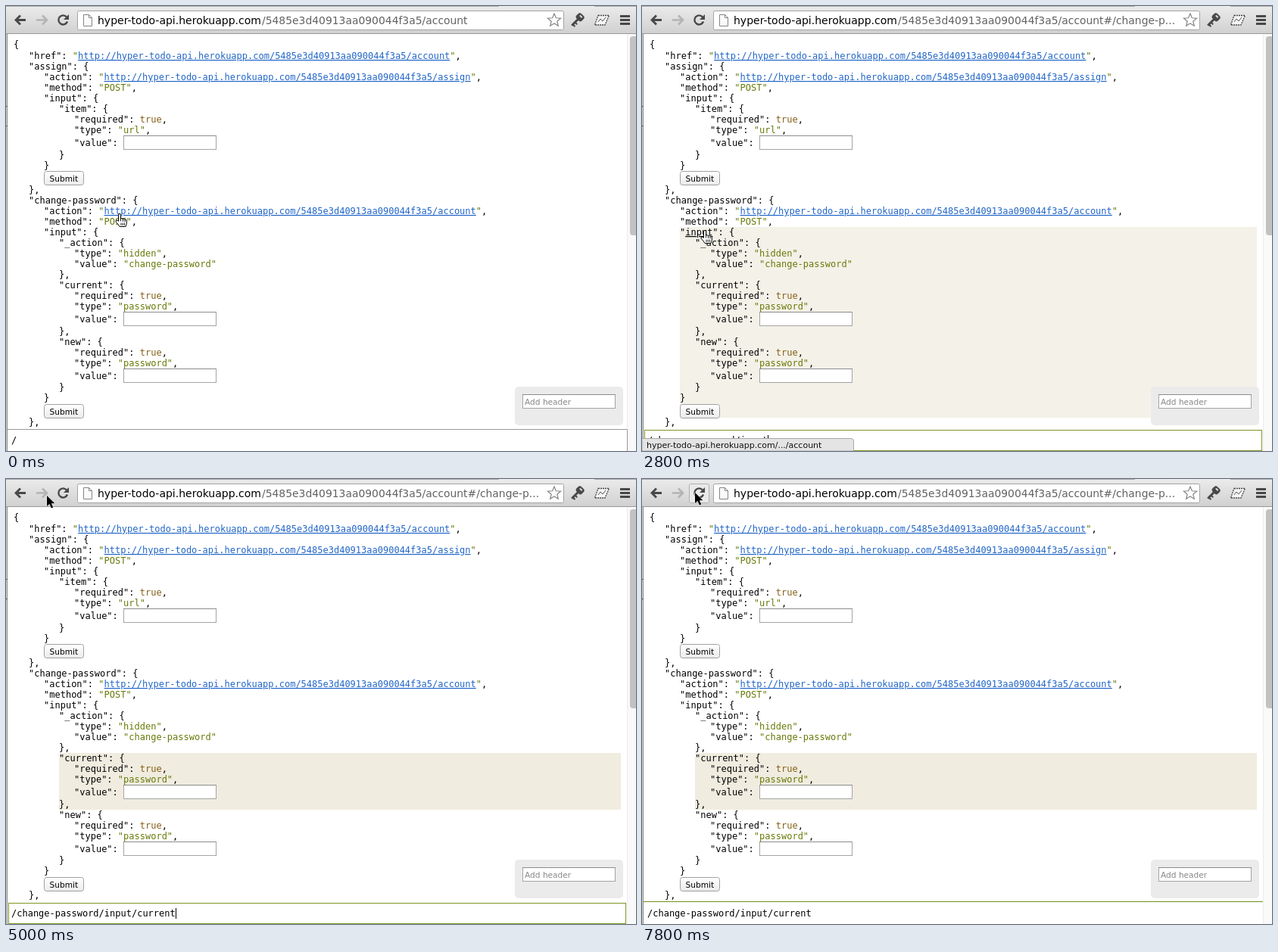
An HTML page that plays this animation: 832 by 588 pixels, repeating every 8 s.

```html
<!DOCTYPE html>
<html lang="en">
<head>
<meta charset="utf-8">
<title>Hypermedia browser</title>
<style>
html, body { margin: 0; width: 100%; height: 100%; overflow: hidden; background: #fff; }
svg { display: block; width: 832px; height: 588px; }
text { white-space: pre; }
.mono { font: 12px "DejaVu Sans Mono", monospace; fill: #000; }
.ui { font-family: "DejaVu Sans", sans-serif; }
.str { fill: #667a08; }
.bool { fill: #855f16; }
.link { fill: #2266c8; }
.link, .hover {
  text-decoration: underline 1px;
  text-underline-offset: 1px;
  text-decoration-skip-ink: none;
}
</style>
</head>
<body>
<svg id="stage" viewBox="0 0 832 588" xmlns="http://www.w3.org/2000/svg">
  <defs>
    <linearGradient id="chrome" x2="0" y2="1">
      <stop stop-color="#ebebeb"/><stop offset="1" stop-color="#d0d0d0"/>
    </linearGradient>
    <linearGradient id="button" x2="0" y2="1">
      <stop stop-color="#fff"/><stop offset="1" stop-color="#ebebeb"/>
    </linearGradient>
  </defs>
  <rect width="832" height="588" fill="#fff"/>

  <g id="page">
    <rect id="mark" x="0" y="0" width="0" height="0" fill="#f0ecdf"/>
    <g id="json"></g>
    <rect x="672" y="503" width="143" height="51" rx="5" fill="#ebebeb"/>
    <g id="headerField"></g>
    <text class="ui" x="685" y="527" font-size="10.6" fill="#868686">Add header</text>
    <rect x="820" y="37" width="12" height="551" fill="#f9f9f9"/>
    <path d="M820.5 37V588" stroke="#ececec"/>
    <rect x="824" y="40" width="12" height="263" rx="4" fill="#c2c2c2"/>
    <rect x="2" y="558" width="818" height="30" fill="#fff"/>
    <path id="barIdle" d="M2 559.5H820.5V588" fill="none" stroke="#999"/>
    <path id="barSet" d="M2 558.5H820" stroke="#71901a"/>
    <rect id="barFocus" x="3.5" y="560.5" width="815" height="27" fill="none" stroke="#7c9622"/>
    <text id="path" class="mono" x="7" y="578"></text>
    <path id="caret" stroke="#000"/>
  </g>

  <path d="M0.5 37V588" stroke="#d9d9d9"/>
  <path d="M1.5 37V588" stroke="#858585"/>
  <path d="M0 132.5H2M0 158.5H2" stroke="#555"/>

  <rect width="832" height="37" fill="url(#chrome)"/>
  <path d="M0 .5H651M777 .5H832" stroke="#a9a9a9"/>
  <path d="M0 36.5H832" stroke="#999"/>
  <path d="M26 18.5H14M19 12.5L13 18.5L19 24.5" fill="none" stroke="#484848" stroke-width="2.8"/>
  <path d="M40 18.5H53M48 12.5L54 18.5L48 24.5" fill="none" stroke="#b4b4b4" stroke-width="2.6"/>
  <rect id="reloadBox" x="62.5" y="6.5" width="26" height="25" rx="2" fill="#e9e9e9" stroke="#b0b0b0"/>
  <g id="reload">
    <path d="M80 14.6A6 6 0 1 0 81 20.5" fill="none" stroke="#484848" stroke-width="2.4"/>
    <path d="M83 11V18H76Z" fill="#484848"/>
  </g>
  <path id="stop" d="M70 13L81 24M81 13L70 24" stroke="#484848" stroke-width="3"/>

  <rect x="94.5" y="6.5" width="642" height="25" rx="2" fill="#fff" stroke="#a3a3a3"/>
  <path d="M102.5 11.5H109.5L113.5 15.5V26.5H102.5ZM109.5 11.5V15.5H113.5" fill="#fafafa" stroke="#858585"/>
  <text class="ui" x="121" y="24" font-size="14" fill="#000">hyper-todo-api.herokuapp.com</text>
  <text id="url" class="ui" x="338" y="24" font-size="13.9" fill="#626262"></text>
  <path id="star" fill="#fff" stroke="#858585" stroke-width="1.2"/>
  <g transform="translate(755 18) rotate(45)" fill="#484848">
    <rect x="-5" y="-9" width="10" height="9" rx="3"/>
    <rect x="-1.5" y="-1" width="3" height="12"/>
    <rect x="1" y="4" width="3" height="2"/><rect x="1" y="8" width="3" height="2"/>
    <rect x="-2" y="-7" width="4" height="2" fill="#ddd"/>
  </g>
  <path d="M782 12.5H796.5L791 25H777.5Z" fill="#f4f4f4" stroke="#444" stroke-width="1.3" stroke-dasharray="2 1"/>
  <path d="M782 21L785 17L788 20L792 15" fill="none" stroke="#555"/>
  <path d="M811 13.5H824M811 18.5H824M811 23.5H824" stroke="#484848" stroke-width="2.8"/>

  <g id="status">
    <path d="M0 571.5H276Q279.5 571.5 279.5 575V588H0Z" fill="#e4e4e4" stroke="#a8a8a8"/>
    <text id="statusText" class="ui" x="6" y="584" font-size="11" fill="#111"></text>
  </g>

  <g id="hand" stroke="#000" stroke-linejoin="round" stroke-linecap="round">
    <path d="M-1.5 9V1.2Q-1.5 -.6 0 -.6T1.5 1.2V6Q3 4.8 4.3 6.4Q6 5.4 7 7.2Q9.3 6.6 9.3 9V12Q9 14 8 16.5H0Q-2 13 -5 10.2Q-5.4 7.4 -3 8Z" fill="#fff"/>
    <path d="M1.5 6V9M4.4 6.5V9.5M7 7.4V10M2 12V14.5M4.2 12V14.5M6.4 12V14.5" fill="none" stroke-width=".9"/>
  </g>
  <path id="arrow" d="M0 0V14L3.4 11L5.8 16.6L8.3 15.5L5.9 10.2H10.4Z" fill="#000" stroke="#fff" stroke-width="1" paint-order="stroke"/>
</svg>

<script>
const $ = id => document.getElementById(id);
const LOOP = 8000, STEP = 200, CHAR = 7.224;
const BASE = 'http://hyper-todo-api.herokuapp.com/5485e3d40913aa090044f3a5/';

// indent | distance from the line above (14 if empty) | content
const LINES = `0||{
1|15|"href": "@account",
1||"assign": {
2||"action": "@assign",
2||"method": "POST",
2||"input": {
3||"item": {
4||"required": true,
4||"type": "url",
4|17|"value": []
3|16|}
2||}
2|17|Submit
1|15|},
1||"change-password": {
2||"action": "@account",
2||"method": "POST",
2||"input": {
3||"_action": {
4||"type": "hidden",
4||"value": "change-password"
3||},
3||"current": {
4||"required": true,
4||"type": "password",
4|17|"value": []
3|16|},
3||"new": {
4||"required": true,
4||"type": "password",
4|17|"value": []
3|15|}
2||}
2|18|Submit
1|14|},`.split('\n');

const field = (x, y) =>
  `<rect x="${x + .5}" y="${y + .5}" width="122" height="18" fill="#fff" stroke="#a4a4a4"/>` +
  `<path d="M${x} ${y + .5}h123" stroke="#8c8c8c"/>`;

const button = y =>
  `<rect x="50.5" y="${y - 9.5}" width="52" height="18" rx="3" fill="url(#button)" stroke="#a0a0a0"/>` +
  `<text class="ui" x="57.5" y="${y + 4}" font-size="10.6">Submit</text>`;

function colour(line, y) {
  return line
    .replace(/^"([^"]+)":/, (m, key) => `"<tspan data-key="${key}-${y}">${key}</tspan>":`)
    .replace(/: "@(\w+)"/, `: <tspan class='str'>"</tspan><tspan class='link'>${BASE}$1</tspan><tspan class='str'>"</tspan>`)
    .replace(/: ("[^"@]*")/, `: <tspan class='str'>$1</tspan>`)
    .replace(/: true/, `: <tspan class='bool'>true</tspan>`);
}

function buildPage() {
  let y = 37, out = '';
  for (const row of LINES) {
    const [indent, step, text] = row.split('|');
    const x = 10 + 20 * indent;
    y += +step || 14;
    if (text === 'Submit') { out += button(y); continue; }
    out += `<text class="mono" x="${x}" y="${y + 4}">${colour(text.replace('[]', ''), y)}</text>`;
    if (text.endsWith('[]')) out += field(155, y - 10);
  }
  $('json').innerHTML = out;
  $('headerField').innerHTML = field(682, 513);
}

function buildStar() {
  const pts = Array.from({ length: 10 }, (_, i) => {
    const a = (i / 5 - .5) * Math.PI, r = i % 2 ? 4 : 9;
    return `${724 + r * Math.cos(a)} ${19 + r * Math.sin(a)}`;
  });
  $('star').setAttribute('d', `M${pts.join('L')}Z`);
}

// time, x, y of the pointer tip
const MOVES = [
  [0, 150, 275], [200, 150, 275], [800, 113, 254], [1800, 113, 254],
  [2400, 83, 297], [2800, 83, 297], [3400, 110, 363], [4200, 110, 363],
  [5000, 54, 22], [5200, 70, 18], [LOOP, 70, 18]
];

// time, path, box of the selected part
const PICKS = [
  [0, '/', null],
  [1200, '/change-password', [30, 250, 308]],
  [2600, '/change-password/input', [50, 292, 252]],
  [4000, '/change-password/input/current', [70, 362, 75]],
  [6600, '/change-password/input/current', [70, 362, 75]]
];

// from, to, key under the pointer
const HOVERS = [
  [800, 2000, 'change-password-257'],
  [2200, 3000, 'input-299'],
  [3400, 4400, 'current-369']
];

const within = (t, a, b) => t >= a && t < b;
const show = (id, on) => $(id).setAttribute('visibility', on ? 'visible' : 'hidden');
const set = (id, attrs) => { for (const k in attrs) $(id).setAttribute(k, attrs[k]); };

function pointer(t) {
  const i = MOVES.findIndex(m => m[0] > t);
  const [t0, x0, y0] = MOVES[i - 1], [t1, x1, y1] = MOVES[i];
  const p = (t - t0) / (t1 - t0), e = p * p * (3 - 2 * p);
  return [x0 + (x1 - x0) * e, y0 + (y1 - y0) * e].map(Math.round);
}

function draw(t) {
  const [start, path, box] = PICKS.filter(p => p[0] <= t).pop();
  const loading = within(t, 5600, 6600);
  const focused = within(t, 1200, 3600) || within(t, 4000, 5400);

  $('page').setAttribute('display', loading ? 'none' : 'inline');
  if (box) {
    set('mark', { x: box[0], y: box[1], width: 812 - box[0], height: box[2],
      opacity: Math.min(1, .4 + (t - start) / 650) });
  } else set('mark', { opacity: 0 });

  $('barIdle').style.display = box ? 'none' : '';
  $('barSet').style.display = box && !focused ? '' : 'none';
  $('barFocus').style.display = $('caret').style.display = focused ? '' : 'none';
  $('path').textContent = path;
  set('caret', { d: `M${Math.round(7 + path.length * CHAR) + .5} 567V581` });
  $('url').textContent = '/5485e3d40913aa090044f3a5/account' + (box ? '#/change-p...' : '');

  for (const [a, b, key] of HOVERS)
    document.querySelector(`[data-key="${key}"]`).classList.toggle('hover', within(t, a, b));

  show('status', within(t, 800, 4600) || loading);
  $('statusText').textContent = loading
    ? 'Waiting for extension hyper.chrome...'
    : 'hyper-todo-api.herokuapp.com/.../account';

  show('reloadBox', t >= 5200);
  show('reload', !loading);
  show('stop', loading);

  const [x, y] = pointer(t), hand = t < 4400;
  show('hand', hand);
  show('arrow', !hand);
  set(hand ? 'hand' : 'arrow', { transform: `translate(${x} ${y})` });
}

buildPage();
buildStar();
const begin = performance.now();
let last = -1;
function tick() {
  const t = Math.floor((performance.now() - begin) % LOOP / STEP) * STEP;
  if (t !== last) draw(last = t);
  requestAnimationFrame(tick);
}
tick();
</script>
</body>
</html>
```
